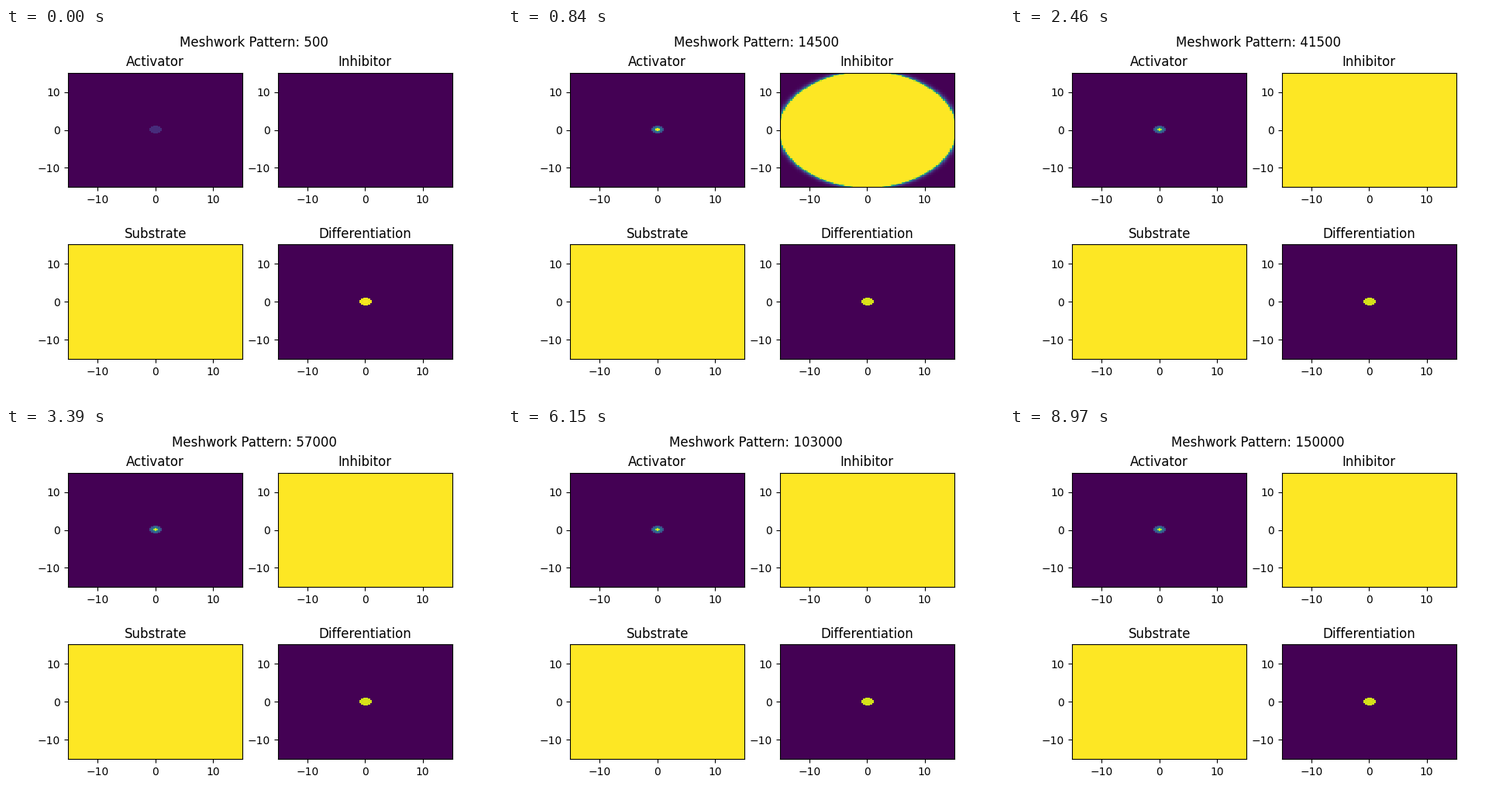
Write a matplotlib script that moves like this. It is 640 px wide and 480 px high and loops after 9000 ms.

```python
import numpy as np
import matplotlib.pyplot as plt
from matplotlib.animation import FuncAnimation

FRAMES, INTERVAL, STEPS = 300, 30, 500
CELLS, HALF = 101, 15.15

idx = np.arange(CELLS) - CELLS // 2
I, J = np.meshgrid(idx, idx)
D2 = I**2 + J**2          # squared distance in cells
R2 = D2 * 0.3**2          # squared distance in data units
SEED = D2 <= 11
CORE = D2 <= 2

RINGS = [0, 1, 2, 4, 5, 8, 10, 13, 17, 18]
PEAK = np.interp(D2, RINGS, [1, 1, .72, .38, .33, .26, .23, .02, .01, 0])
REST = np.interp(D2, RINGS, [1, .86, .42, .38, .33, .26, .23, .02, .01, 0])


def ramp(n, start, end):
    x = np.clip((n - start) / (end - start), 0, 1)
    return x * x * (3 - 2 * x)


def activator(n):
    grow = 1 - np.exp(-n / 5)
    settle = ramp(n, 24, 52)
    profile = PEAK + (REST - PEAK) * settle
    return 0.125 * SEED * (1 - grow) + profile * grow


def inhibitor(n):
    """Diffusing front: a clipped Gaussian that widens with time."""
    if n == 0:
        return np.zeros_like(R2)
    t = n / 28
    front = 15.2 * t**0.56
    return np.exp(np.clip((front**2 - R2) / (9 * t), -50, 0))


def substrate(n):
    return np.ones_like(R2)


def differentiation(n):
    level = 0.98 - 0.05 * min(n / 31, 1)
    return SEED * level + CORE * 0.015


FIELDS = {
    "Activator": activator,
    "Inhibitor": inhibitor,
    "Substrate": substrate,
    "Differentiation": differentiation,
}

fig, axes = plt.subplots(2, 2, figsize=(6.4, 4.8), dpi=100)
fig.subplots_adjust(hspace=0.5)
title = fig.suptitle("")

images = []
for ax, (name, field) in zip(axes.flat, FIELDS.items()):
    images.append(ax.imshow(
        field(0), vmin=0, vmax=1, cmap="viridis", origin="lower",
        aspect="auto", interpolation="nearest",
        extent=(-HALF, HALF, -HALF, HALF)))
    ax.set_title(name)
    ax.set_xticks([-10, 0, 10])
    ax.set_yticks([-10, 0, 10])


def update(n):
    title.set_text(f"Meshwork Pattern: {(n + 1) * STEPS}")
    for image, field in zip(images, FIELDS.values()):
        image.set_data(field(n))
    return [title, *images]


anim = FuncAnimation(fig, update, frames=FRAMES, interval=INTERVAL,
                     repeat=True, repeat_delay=0)
plt.show()
```
